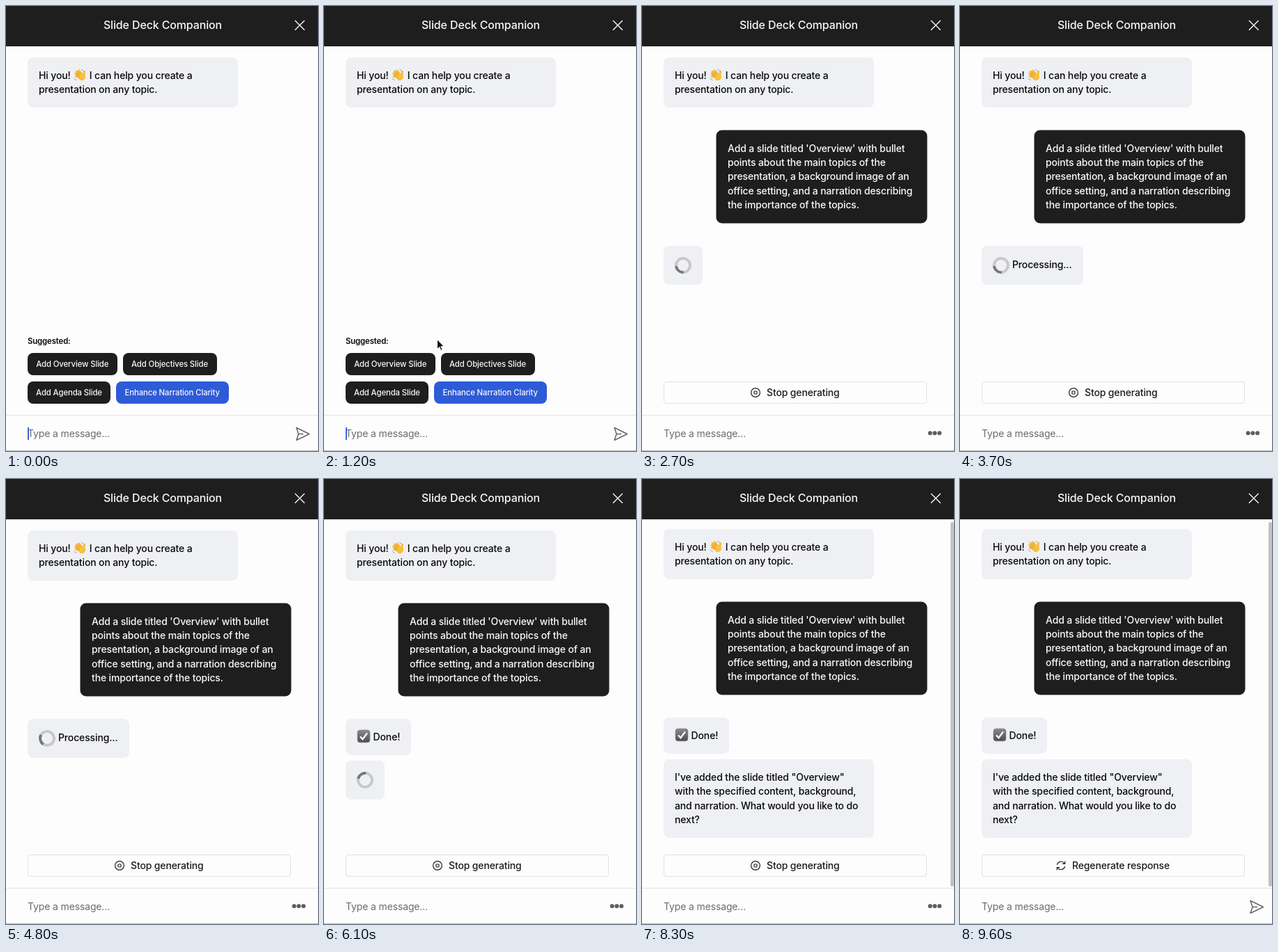
Animation, 448 px wide and 640 px high, one loop 9.7 s. Source, as an HTML page:

```html
<!DOCTYPE html>
<html lang="en">
<head>
<meta charset="utf-8">
<title>Chat</title>
<style>
html, body { margin: 0; width: 100%; height: 100%; overflow: hidden; background: #fdfdfd; }
body { position: relative; font: 450 14px/20.25px Inter, "Liberation Sans", sans-serif; letter-spacing: -.01em; color: #080808; }
div, svg.layer { position: absolute; box-sizing: border-box; white-space: pre; }
header { position: absolute; width: 448px; height: 58px; background: #1e1e1e; color: #f6f6f6;
  font-size: 16px; font-weight: 500; line-height: 54px; text-align: center; text-indent: 2px; }
#chat { left: 0; top: 0; }
.bubble { left: 31px; padding: 16px; border-radius: 8px; background: #eff0f4; }
.wide { width: 302px; }
.user { left: 107px; top: 178.8px; background: #1e1e1e; color: #fafafa; box-shadow: 0 0 0 .5px #1e1e1e; }
.row { display: flex; align-items: center; gap: 4px; }
.spin { width: 24px; height: 24px; box-sizing: border-box; border: 4px solid #c7c7cc; border-top-color: #777781; border-radius: 50%; }
.chip { height: 32px; border-radius: 8px; background: #1e1e1e; color: #f6f6f6;
  font-size: 11.4px; font-weight: 500; line-height: 32px; text-align: center; }
.action { left: 31px; top: 539.5px; width: 378px; height: 32px; border: 1px solid #e1e1e3; border-radius: 4px;
  font-weight: 500; line-height: 30px; color: #1c1c1c; }
.layer { left: 0; top: 0; }
.inline { vertical-align: -2px; margin: -2px 0; }
</style>
</head>
<body>
<div id="chat">
  <div class="bubble wide" style="top:73.8px">Hi you! <svg class="inline" width="20" height="19" viewBox="-.7 0 20 19" fill="none" stroke-linecap="round"><g stroke="#f5b93a" stroke-width="2.8"><path d="M10 12 3 7M11 10 4.5 4M13 9 8 2.8M12 14 3.5 11"/><path d="M15 10 16 4.5"/></g><ellipse cx="12.2" cy="11.8" rx="5.2" ry="5.4" fill="#f8c040"/><path d="M9 9.5 4.5 6.5M10.5 8 6.5 4M9 12 4.5 9.2" stroke="#d98d25" stroke-width=".7"/><path d="M12 1.5Q14 2 14.5 3.5M1.5 14Q2.5 16 4.5 16.5" stroke="#8c9aa8" stroke-width="1"/></svg> I can help you create a
presentation on any topic.</div>
  <div class="bubble wide user" data-on="2150">Add a slide titled 'Overview' with bullet
points about the main topics of the
presentation, a background image of an
office setting, and a narration describing
the importance of the topics.</div>
  <div class="bubble row" style="top:344.5px" data-on="2300,5950"><span class="spin" data-turn="-32"></span><span data-on="3700">Processing...</span></div>
  <div class="bubble" style="top:344.5px" data-on="5950"><svg class="inline" width="20" height="20" viewBox="0 0 20 20"><defs><linearGradient id="tile" x2="0" y2="1"><stop stop-color="#8b8b8b"/><stop offset="1" stop-color="#4c4c4c"/></linearGradient></defs><rect x="1.2" y="1.2" width="17.6" height="17.6" rx="3.5" fill="url(#tile)" stroke="#666" stroke-width=".7"/><path d="M5 10.5 8.5 14.3 15 5.5" fill="none" stroke="#fff" stroke-width="2.3"/></svg> Done!</div>
  <div class="bubble" style="top:405px" data-on="6000,6800"><span class="spin" data-turn="-72" style="display:block"></span></div>
  <div class="bubble" id="reply" style="top:405px" data-on="6800"></div>
</div>

<header>Slide Deck Companion</header>

<div data-on="0,2150">
  <div style="left:31px;top:472px;font-size:11.4px;font-weight:600">Suggested:</div>
  <div class="chip" id="pick" style="left:31px;top:499px;width:128.5px">Add Overview Slide</div>
  <div class="chip" style="left:167.5px;top:499px;width:135px">Add Objectives Slide</div>
  <div class="chip" style="left:31px;top:539.5px;width:119px">Add Agenda Slide</div>
  <div class="chip" style="left:158px;top:539.5px;width:161.5px;background:#2e5bd8">Enhance Narration Clarity</div>
</div>
<div class="action" style="padding-left:147px" data-on="2150,8500">Stop generating</div>
<div class="action" style="padding-left:129px" data-on="8500">Regenerate response</div>

<div style="left:0;top:587.5px;width:448px;height:1px;background:#e2e2e4"></div>
<div style="left:0;top:639px;width:448px;height:1px;background:#b8b8b8"></div>
<div style="left:31px;top:605px;color:#6c6c6c;font-weight:400">Type a message...</div>
<div id="caret" style="left:31px;top:606px;width:2px;height:18px;background:#3b68d9"></div>
<div style="left:443px;top:62px;width:5px;height:524px;border-radius:2px;background:#c2c2c4" data-on="8225"></div>

<svg class="layer" width="448" height="640" fill="none" stroke-linejoin="round">
  <path d="M415.3 21.3l13 13M428.3 21.3l-13 13" stroke="#f6f6f6" stroke-width="1.4" stroke-linecap="round"/>
  <g id="send" stroke="#666" stroke-width="1.5"><path d="M417 606.5 435.5 615.5 417 624.5 420 615.5ZM420 615.5H427"/></g>
  <g id="dots" fill="#5e5e62"><circle cx="413.7" cy="614.3" r="3"/><circle cx="420.4" cy="614.3" r="3"/><circle cx="427.1" cy="614.3" r="3"/></g>
  <g data-on="2150,8500" stroke="#222" stroke-width="1.2"><circle cx="163" cy="556" r="6.4"/><rect x="161" y="554" width="4" height="4" rx=".8"/></g>
  <g data-on="8500" stroke="#222" stroke-width="1.2" stroke-linecap="round"><path d="M139.5 554.5A5.8 5.8 0 0 1 150 553M150.8 550v3.4h-3.4M150.5 557.5A5.8 5.8 0 0 1 140 559M139.2 562v-3.4h3.4"/></g>
  <g id="mouse">
    <path id="arrow" d="M0 0V14L3.2 11 5.4 16 7.6 15 5.4 10.2H9.8Z" fill="#111" stroke="#fff"/>
    <path id="hand" d="M-1.5 1Q-1.5-.7 0-.7T1.5 1V6Q3 4.8 4 6.4 5.6 5.6 6.2 7.2 8 6.8 8 8.6V11.5Q7.5 13.5 6.5 16H-.5Q-2 13-4.2 10.2-4.8 8.6-3.2 8.5L-1.5 10ZM1.5 10.5V13.5M3.5 10.5V13.5M5.3 10.5V13.5" fill="#fff" stroke="#111"/>
  </g>
</svg>

<script>
const LOOP = 9700, SENT = 2150, FINISHED = 8500;
const $ = id => document.getElementById(id);
const show = (el, on) => { el.style.display = on ? '' : 'none'; };
const ramp = (t, from, to) => {
  const u = Math.min(1, Math.max(0, (t - from) / (to - from)));
  return u * u * (3 - 2 * u);
};

const timed = [...document.querySelectorAll('[data-on]')].map(el => {
  const [from, to = LOOP] = el.dataset.on.split(',').map(Number);
  return { el, from, to };
});
const spinners = document.querySelectorAll('.spin');
const words = `I've added the slide titled "Overview"
with the specified content, background,
and narration. What would you like to do
next?`.split(/(?<=\s)/);

function typeReply(t) {
  const count = Math.max(0, Math.floor((t - 6800) / 75) + 1);
  const text = words.slice(0, count).join('').trimEnd();
  const lines = text.split('\n').length;
  $('reply').textContent = text;
  $('reply').style.width = lines > 1 ? '302px' : '';
  $('chat').style.transform = lines > 3 ? 'translateY(-2px)' : '';
}

function moveMouse(t) {
  const enter = ramp(t, 900, 1500), leave = ramp(t, 2200, 2600);
  const x = 240 - 155 * enter + 30 * leave;
  const y = 440 + 79 * enter + 130 * leave;
  const over = t >= 1350 && t < SENT;
  show($('mouse'), t >= 900 && t < 2600);
  $('mouse').setAttribute('transform', `translate(${x} ${y})`);
  show($('hand'), over);
  show($('arrow'), !over);
  $('pick').style.transform = `scale(${1 + .05 * ramp(t, 1350, 1500)})`;
}

function bounceDots(t) {
  [...$('dots').children].forEach((dot, i) => {
    const u = (t / 1000 % 1 - .44 - .01 * i) / .24;
    const lift = u > 0 && u < 1 ? 5.5 * Math.sin(Math.PI * u) : 0;
    dot.setAttribute('cy', 614.3 - lift);
  });
}

function draw(now) {
  const t = now % LOOP, busy = t >= SENT && t < FINISHED;
  timed.forEach(({ el, from, to }) => show(el, t >= from && t < to));
  spinners.forEach(el => { el.style.transform = `rotate(${t * .36 + +el.dataset.turn}deg)`; });
  show($('caret'), t < 2000 && t % 1000 < 500);
  show($('send'), !busy);
  show($('dots'), busy);
  typeReply(t);
  moveMouse(t);
  bounceDots(t);
}

let start;
function frame(now) {
  start ??= now;
  draw(now - start);
  requestAnimationFrame(frame);
}
draw(0);
requestAnimationFrame(frame);
</script>
</body>
</html>
```
